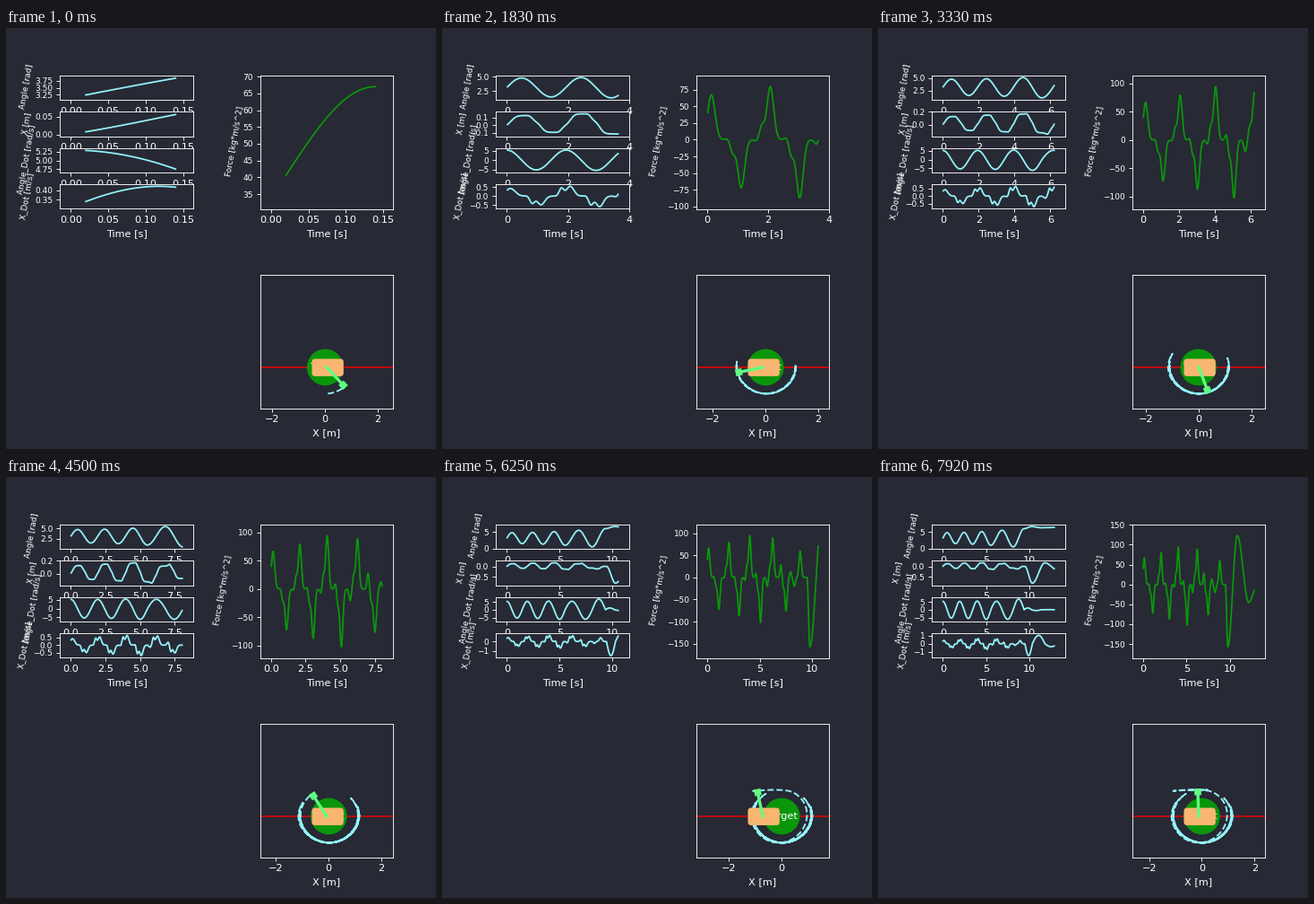
Animation, 480 px wide and 469 px high, one loop 8 s. Source, as a matplotlib script:

```python
import numpy as np
import matplotlib.pyplot as plt
from matplotlib.animation import FuncAnimation
from matplotlib.patches import Circle, FancyBboxPatch, Polygon

W, H, DPI = 480, 469, 80
FRAMES, FRAME_MS = 100, 80
BG, CYAN, GREEN = "#272934", "#93f2fb", "#0a960a"
LIME, ORANGE, RED = "#5eff7f", "#f8b670", "#e90202"
SMALL, LARGE = 8.06, 10.08

plt.rcParams.update({
    "font.family": "DejaVu Sans", "font.size": LARGE,
    "figure.facecolor": BG, "axes.facecolor": BG, "axes.edgecolor": "white",
    "axes.labelcolor": "white", "text.color": "white",
    "xtick.color": "white", "ytick.color": "white",
    "xtick.labelsize": LARGE, "ytick.labelsize": SMALL,
})


# --- simulated signals -------------------------------------------------

DT = .005
TIME = np.arange(0, 12.86, DT)


def ease(times, values):
    """Half cosine waves between turning points."""
    x, y = np.array(times), np.array(values)
    t = np.clip(TIME, x[0], x[-1])
    i = np.clip(np.searchsorted(x, t) - 1, 0, len(x) - 2)
    u = (t - x[i]) / (x[i + 1] - x[i])
    return y[i] + (y[i + 1] - y[i]) * (1 - np.cos(np.pi * u)) / 2


def bell(centre, width):
    return np.exp(-((TIME - centre) / width) ** 2 / 2)


# The pendulum swings ever wider about pi, then settles upright at 2 pi
TURNS = [-.48, .48, 1.45, 2.43, 3.42, 4.48, 5.52, 6.82, 8.1]
reach = [np.pi + (-1) ** n * (1.61 + .02 * n * n) for n in range(-1, 8)]
angle = ease(TURNS + [9.35, 10.2, 11.3, 13], reach + [5.95, 6.58, 6.22, 6.32])
spin = np.gradient(angle, DT)

# One push per half swing: a shoulder, a peak and a growing counter push
force = 67 * bell(.14, .12)
speed = .42 * bell(.12, .15)
for n, (start, end) in enumerate(zip(TURNS[1:-1], TURNS[2:])):
    sign = -(-1) ** n
    peak = start + (end - start) * (.66 - .02 * n)
    push = sign * np.interp(n, [0, 4, 6], [72, 102, 76])
    counter = -sign * (2 + .75 * n * n) * bell(start + .2, .08)
    force += push * (bell(peak, .11) + .26 * bell(peak - .28, .08)) + counter
    speed += .0068 * (push * (bell(peak, .12) + .8 * bell(peak - .29, .075))
                      + counter)

# The catch, then a damped swing of the cart
force += 13 * bell(7.93, .08) - 20 * bell(8.3, .1) + 60 * bell(8.85, .11)
speed += .4 * bell(8.9, .12) - .2 * bell(8.3, .09)
force += ease([9.5, 9.78, 10.87, 12.2, 13.2], [0, -157, 123, -45, 0])
place = np.cumsum(speed) * DT + ease([9.45, 10.3, 11.75, 13.2],
                                     [0, -.8, .17, -.17])
cart_speed = np.gradient(place, DT)
tip_x, tip_y = place - np.sin(angle), np.cos(angle)


def sim_time(i):
    """Simulated seconds: a 10 fps recording replayed at 12 fps."""
    tick = int((FRAME_MS * (i + 1) - 1) * .012)
    step = int(.823 * tick + .6)
    return np.interp(step, [0, 10, 26, 45, 62, 78],
                     [.149, 2.15, 5.155, 8.04, 10.57, 12.83])


# --- figure ------------------------------------------------------------

fig = plt.figure(figsize=(W / DPI, H / DPI), dpi=DPI)


def add_axes(x0, y0, x1, y1):
    return fig.add_axes([x0 / W, 1 - y1 / H, (x1 - x0) / W, (y1 - y0) / H])


def add_plot(box, data, label, color):
    ax = add_axes(*box)
    ax.set_ylabel(label, rotation=80, fontsize=SMALL)
    line, = ax.plot([], [], color=color, lw=1.6)
    return ax, line, data


plots = []
for row, (data, label) in enumerate([(angle, "Angle [rad]"), (place, "X [m]"),
                                     (spin, "Angle_Dot [rad/s]"),
                                     (cart_speed, "X_Dot [m/s]")]):
    top = 52.9 + 40.4 * row
    plots.append(add_plot((60, top, 209.2, top + 27.2), data, label, CYAN))
plots[-1][0].set_xlabel("Time [s]", labelpad=4.6)
plots.append(add_plot((283.5, 52.9, 432.4, 201.6), force,
                      "Force [kg*m/s^2]", GREEN))
plots[-1][0].set_xlabel("Time [s]", labelpad=4.6)

scene = add_axes(284, 274.9, 431.9, 423.6)
scene.set_ylim(-1.55, 3.5)
scene.set_yticks([])
scene.set_xlabel("X [m]", labelpad=4.6)
scene.axhline(0, color=RED, lw=1.4, zorder=1)
scene.add_patch(Circle((0, 0), .69, color=GREEN, lw=0, zorder=2))
scene.text(0, 0, "Target", ha="center", va="center", zorder=3)
trace, = scene.plot([], [], "--", color=CYAN, lw=1.7, zorder=4)
cart = FancyBboxPatch((0, -.34), 1.2, .66, fc=ORANGE, lw=0, zorder=5,
                      boxstyle="round,pad=0,rounding_size=0.12")
scene.add_patch(cart)
pole, = scene.plot([], [], color=LIME, lw=3, zorder=6)
bob = Polygon(np.zeros((4, 2)), color=LIME, lw=0, zorder=7)
scene.add_patch(bob)


def draw(i):
    now = sim_time(i)
    past = TIME <= now
    shown = (TIME > .016) & (TIME < now - .007)
    for ax, line, data in plots:
        line.set_data(TIME[shown], data[shown])
        low, high = data[past].min(), data[past].max()
        pad = .1 * (high - low)
        ax.set_xlim(-.1 * now, 1.1 * now)
        ax.set_ylim(low - pad, high + pad)

    x, a = np.interp(now, TIME, place), np.interp(now, TIME, angle)
    along = np.array([-np.sin(a), np.cos(a)])
    side = np.array([np.cos(a), np.sin(a)])
    pivot = np.array([x, 0])
    scene.set_xlim(x - 2.515, x + 2.515)
    trace.set_data(tip_x[shown], tip_y[shown])
    cart.set_x(x - .56)
    pole.set_data(*np.array([pivot, pivot + .93 * along]).T)
    bob.set_xy([pivot + r * along + s * side
                for r, s in [(.8, -.13), (.8, .13), (1.05, .13), (1.05, -.13)]])
    return []


anim = FuncAnimation(fig, draw, frames=FRAMES, interval=FRAME_MS,
                     init_func=lambda: draw(0), repeat=True, repeat_delay=0)
plt.show()
```
